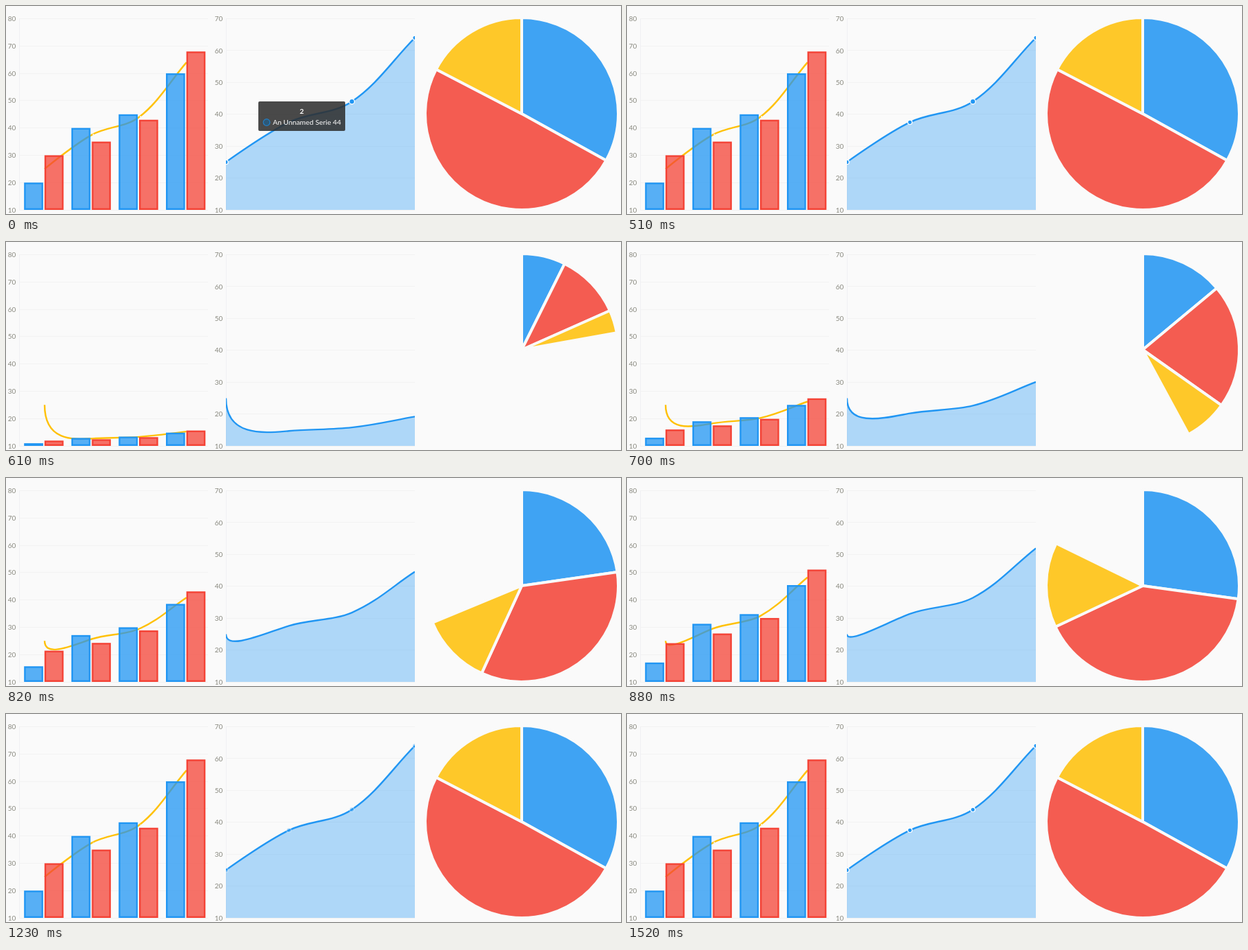
Recreate the animation shown at these times as an HTML page with a canvas. Size 892 by 303 pixels, loop 2.01 s.

```html
<!DOCTYPE html>
<html lang="en">
<head>
<meta charset="utf-8">
<style>
html, body { margin: 0; width: 100%; height: 100%; overflow: hidden; background: #fafafa; }
canvas { display: block; }
</style>
</head>
<body>
<canvas id="stage" width="892" height="303"></canvas>
<script>
const ctx = document.getElementById('stage').getContext('2d');
const LOOP = 2010, BASE = 297, TOP = 18.5;
const BG = '#fafafa', BLUE = '#2196f3', RED = '#f44336', YELLOW = '#ffc107';
const FONT = 'Lato, "Open Sans", sans-serif';
const TREND = [25, 37.5, 44, 64];
const COLUMNS = [
  { color: BLUE, x: 26.2, values: [20, 40, 45, 60] },
  { color: RED, x: 55.8, values: [30, 35, 43, 68] }
];
const SLICES = [[BLUE, 40], [RED, 60], [YELLOW, 21]];
const SLICE_TOTAL = SLICES.reduce((sum, s) => sum + s[1], 0);
// Intervals during which the picture rests on its first moment.
const HOLDS = [[610, 640], [700, 750], [820, 850], [980, 1010]];

const ramp = (t, from, to) => Math.min(1, Math.max(0, (t - from) / (to - from)));
const scaleTo = max => v => BASE - (v - 10) * (BASE - TOP) / (max - 10);
const scaleLeft = scaleTo(80), scaleMid = scaleTo(70);

function withAlpha(alpha, draw) {
  ctx.save();
  ctx.globalAlpha = alpha;
  draw();
  ctx.restore();
}

function text(str, x, y, size, color, align = 'left', weight = 400) {
  ctx.font = `${weight} ${size}px ${FONT}`;
  ctx.fillStyle = color;
  ctx.textAlign = align;
  ctx.fillText(str, x, y);
}

function circle(x, y, r, fill, stroke, width) {
  ctx.beginPath();
  ctx.arc(x, y, r, 0, 2 * Math.PI);
  ctx.fillStyle = fill;
  ctx.fill();
  if (!stroke) return;
  ctx.strokeStyle = stroke;
  ctx.lineWidth = width;
  ctx.stroke();
}

function axis(left, max, scale) {
  for (let v = 10; v <= max; v += 10) {
    const y = scale(v);
    ctx.fillStyle = '#f2f2f2';
    ctx.fillRect(left, Math.floor(y), 274, 1);
    text(String(v), left - 4.7, y + 3.6, 10, '#88887e', 'right');
  }
  ctx.fillStyle = '#f0f0f3';
  ctx.fillRect(left, TOP, 1, BASE - TOP);
}

// Smooth cubic segments whose control lengths follow the neighbouring chords.
function segments(pts) {
  const mid = (a, b) => ({ x: (a.x + b.x) / 2, y: (a.y + b.y) / 2 });
  const dist = (a, b) => Math.hypot(b.x - a.x, b.y - a.y);
  const control = (p, from, to, k) => ({
    x: p.x + (from.x - to.x) * k * 0.7,
    y: p.y + (from.y - to.y) * k * 0.7
  });
  return pts.slice(1).map((p2, i) => {
    const p1 = pts[i], p0 = pts[i - 1] || p1, p3 = pts[i + 2] || p2;
    const before = mid(p0, p1), here = mid(p1, p2), after = mid(p2, p3);
    const l1 = dist(p0, p1), l2 = dist(p1, p2), l3 = dist(p2, p3);
    const c1 = i ? control(p1, here, before, l2 / (l1 + l2)) : p1;
    const c2 = control(p2, here, after, l2 / (l2 + l3));
    return [c1, c2, p2];
  });
}

// The start point stays put while every later point rises from the base.
function curvePath(pts, grow) {
  const rise = y => BASE + (y - BASE) * grow;
  const path = new Path2D();
  path.moveTo(pts[0].x, pts[0].y);
  for (const [a, b, c] of segments(pts))
    path.bezierCurveTo(a.x, rise(a.y), b.x, rise(b.y), c.x, rise(c.y));
  return path;
}

function strokeCurve(path, color) {
  ctx.strokeStyle = color;
  ctx.lineWidth = 2.4;
  ctx.lineJoin = 'round';
  ctx.stroke(path);
}

const trendPoints = (x0, step, scale) =>
  TREND.map((v, i) => ({ x: x0 + i * step, y: scale(v) }));
const leftPoints = trendPoints(56, 68.6, scaleLeft);
const midPoints = trendPoints(319, 91.33, scaleMid);

function columnChart(grow, markers) {
  axis(19, 80, scaleLeft);
  strokeCurve(curvePath(leftPoints, grow), YELLOW);
  withAlpha(markers, () => {
    for (const p of leftPoints.slice(1, 3)) circle(p.x + 2, p.y - 0.5, 1.2, '#fff3cf');
  });
  for (const { color, x, values } of COLUMNS) {
    values.forEach((v, i) => {
      const h = (BASE - scaleLeft(v)) * grow;
      const left = x + i * 68.6 + 1.2, inner = Math.max(0, h - 2.4);
      const box = [left, BASE - inner - 1.2, 25.3, inner];
      ctx.fillStyle = ctx.strokeStyle = color;
      withAlpha(0.75, () => ctx.fillRect(...box));
      ctx.lineWidth = 2.4;
      ctx.lineJoin = 'miter';
      ctx.strokeRect(...box);
    });
  }
}

function areaChart(grow, markers, hovered) {
  axis(319, 70, scaleMid);
  ctx.save();
  ctx.beginPath();
  ctx.rect(319, 0, 274, 303);
  ctx.clip();
  const line = curvePath(midPoints, grow);
  const area = new Path2D(line);
  area.lineTo(593, BASE);
  area.lineTo(319, BASE);
  ctx.fillStyle = BLUE;
  withAlpha(0.35, () => ctx.fill(area));
  strokeCurve(line, BLUE);
  withAlpha(markers, () => midPoints.forEach((p, i) =>
    circle(p.x, p.y, hovered && i === 2 ? 3.8 : 3.2, BLUE, '#fff', 1.3)));
  ctx.restore();
}

function pieChart(grow) {
  const cx = 748, cy = 157;
  let angle = -Math.PI / 2;
  ctx.lineJoin = 'round';
  for (const [color, value] of SLICES) {
    const end = angle + 2 * Math.PI * grow * value / SLICE_TOTAL;
    ctx.beginPath();
    ctx.moveTo(cx, cy);
    ctx.arc(cx, cy, 140, angle, end);
    ctx.closePath();
    ctx.fillStyle = color;
    withAlpha(0.86, () => ctx.fill());
    ctx.strokeStyle = BG;
    ctx.lineWidth = 4;
    ctx.stroke();
    angle = end;
  }
}

function tooltip() {
  ctx.beginPath();
  ctx.roundRect(366, 139, 126, 43, 2);
  ctx.fillStyle = 'rgba(48, 48, 48, 0.87)';
  ctx.fill();
  text('2', 429, 156.5, 10.3, '#fff', 'center', 700);
  circle(378, 169.5, 4.8, '#2c5878', '#2380c8', 1.2);
  text('An Unnamed Serie', 387, 173.2, 10.3, '#fff');
  text('44', 474, 173.2, 10.3, '#fff');
}

function draw(time) {
  const hold = HOLDS.find(([from, to]) => time >= from && time < to);
  const t = hold ? hold[0] : time;
  const settled = t < 550;
  const grow = (from, to) => settled ? 1 : ramp(t, from, to);
  const markers = settled ? 1 : ramp(t, 1050, 1520);

  ctx.fillStyle = BG;
  ctx.fillRect(0, 0, 892, 303);
  columnChart(grow(567, 1010), markers);
  areaChart(grow(534, 981), markers, settled);
  pieChart(grow(510, 961));
  if (t < 510) tooltip();
}

const start = performance.now();
function tick() {
  draw((performance.now() - start) % LOOP);
  requestAnimationFrame(tick);
}
tick();
</script>
</body>
</html>
```
